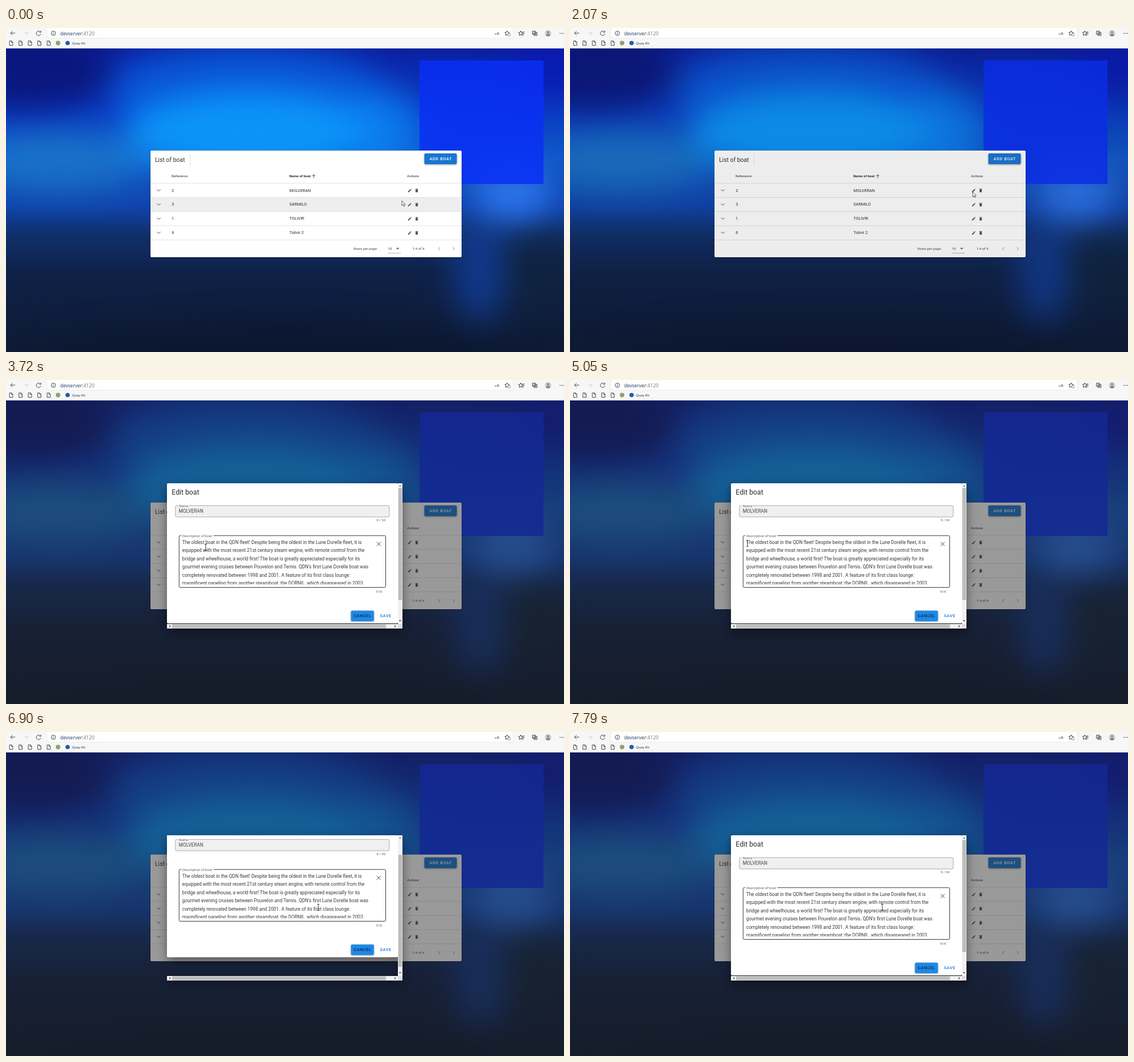
Write an HTML page that moves like this. It is 981 px wide and 571 px high and loops after 8 s.

```html
<!DOCTYPE html>
<html lang="en">
<head>
<meta charset="utf-8">
<title>Boat list</title>
<style>
  html, body { margin: 0; width: 100%; height: 100%; overflow: hidden; background: #0e1a33; }
  svg { display: block; width: 100%; height: 100%; font-family: Roboto, sans-serif; }
  .ui { font-family: "Open Sans", "Noto Sans", sans-serif; }
  .soft { filter: blur(28px); }
  .lift { filter: drop-shadow(0 1px 1.5px rgba(0, 0, 0, .4)); }
  .dialog { filter: drop-shadow(0 6px 9px rgba(0, 0, 0, .45)); }
  .line { fill: none; stroke: #444; stroke-width: 1; }
</style>
</head>
<body>
<svg id="stage" viewBox="0 0 981 571" preserveAspectRatio="none"></svg>
<script>
const LOOP = 8000;
const stage = document.getElementById('stage');

const text = (x, y, size, str, fill = '#2b2b2b', extra = '') =>
  `<text x="${x}" y="${y}" font-size="${size}" fill="${fill}" ${extra}>${str}</text>`;
const rect = (x, y, w, h, fill, extra = '') =>
  `<rect x="${x}" y="${y}" width="${w}" height="${h}" fill="${fill}" ${extra}/>`;
const line = (d, extra = '') => `<path class="line" d="${d}" ${extra}/>`;
const glow = (x, y, rx, ry, fill, opacity = 1) =>
  `<ellipse cx="${x}" cy="${y}" rx="${rx}" ry="${ry}" fill="${fill}" opacity="${opacity}"/>`;
const button = (x, y, str, fill) =>
  text(x, y, 7.25, str, fill, 'text-anchor="middle" font-weight="500" letter-spacing=".65"');
const icon = (x, y, d) =>
  `<path transform="translate(${x - 4.1} ${y - 4.1}) scale(.345)" d="${d}" fill="#555"/>`;

const PENCIL = 'M3 17v4h4L18 10l-4-4zM15 5l4 4 2-3-3-3z';
const BIN = 'M19 4h-3.500l-1-1h-5l-1 1H5v2h14zM6 7v12q0 2 2 2h8q2 0 2-2V7z';

function background() {
  const stops = [[0, '#0a20a0'], [.2, '#0a3cc4'], [.36, '#1058c8'], [.52, '#1044ac'],
    [.61, '#10306c'], [.74, '#0f2148'], [1, '#0e1a33']];
  return `<defs>
    <linearGradient id="sky" x2="0" y2="1">${stops.map(([o, c]) =>
      `<stop offset="${o}" stop-color="${c}"/>`).join('')}</linearGradient>
    <clipPath id="pane"><rect x="283" y="182" width="406" height="248"/></clipPath>
    <clipPath id="area"><rect x="305" y="278" width="340" height="82.300"/></clipPath>
  </defs>` +
  rect(0, 36, 981, 535, 'url(#sky)') +
  `<g class="soft">` +
    glow(40, 75, 150, 70, '#0a1678', .9) +
    glow(420, 110, 240, 80, '#0b60e0', .8) +
    glow(430, 185, 220, 75, '#0c98fa', .95) +
    glow(660, 180, 70, 70, '#0c8cfa', .7) +
    glow(90, 235, 150, 50, '#1c78c8', .8) +
    glow(960, 70, 80, 50, '#0a18b4', .8) +
    glow(890, 290, 70, 50, '#2f78f0', .9) +
    glow(930, 430, 90, 60, '#10243c', .8) +
    glow(833, 430, 45, 90, '#123f9e', .8) +
    glow(480, 575, 400, 50, '#0a1630', .7) +
  `</g>` + rect(727, 57, 218, 218, '#0a30f5', 'opacity=".85"');
}

function boatCard() {
  const rows = [['2', 'MOLVERAN'], ['3', 'SARMILO'], ['1', 'TOLIVIR'], ['6', 'Tolivir 2']];
  const head = (x, str, fill) => text(x, 263, 6.2, str, fill, 'font-weight="700"');
  return rect(254, 216, 547, 188, '#fff', 'rx="2" class="lift"') +
    text(262, 236, 10.2, 'List of boat', '#2b2b2b', 'letter-spacing=".1"') +
    rect(323, 222, .8, 21, '#ddd') +
    rect(735.5, 221, 57, 19, '#1976d2', 'rx="2" class="lift"') +
    button(764.3, 233.2, 'ADD BOAT', '#fff') +
    head(291, 'Reference', '#666') + head(498, 'Name of boat', '#2b2b2b') + head(705, 'Actions', '#666') +
    line('M541 264.500v-6M538.300 261l2.700-2.700 2.700 2.700') +
    rect(254, 299, 547, 24.5, '#eee', 'id="hover"') +
    rows.map(([ref, name], i) => {
      const y = 286 + i * 24.9;
      return rect(254, y - 12.7, 547, .8, '#dcdcdc') +
        line(`M265.500 ${y - 1.5}l3 3 3-3`) +
        text(291.2, y + 2.5, 7.25, ref) + text(498.2, y + 2.5, 7.25, name) +
        icon(709.8, y + .3, PENCIL) + icon(722, y + .3, BIN);
    }).join('') +
    rect(254, 373.2, 547, .8, '#dcdcdc') +
    text(611, 391, 6.2, 'Rows per page:', '#444') + text(671.3, 391, 6.2, '10', '#333') +
    '<path d="M685.500 387.500h6l-3 3z" fill="#666"/>' +
    rect(671, 396.5, 23, .8, '#999') + text(714.5, 391, 6.2, '1-4 of 4', '#444') +
    line('M763 386.300l-2.700 2.700 2.700 2.700M785.800 386.300l2.700 2.700-2.700 2.700', 'opacity=".6"');
}

function editDialog() {
  const story = [
    'The oldest boat in the QDN fleet! Despite being the oldest in the Lune Dorelle fleet, it is',
    'equipped with the most recent 21st century steam engine, with remote control from the',
    'bridge and wheelhouse, a world first! The boat is greatly appreciated especially for its',
    'gourmet evening cruises between Pouvelon and Ternis. QDN\'s first Lune Dorelle boat was',
    'completely renovated between 1998 and 2001. A feature of its first class lounge:',
    'magnificent paneling from another steamboat, the DORNIL, which disappeared in 2003.'
  ];
  const form = rect(283, 182, 406, 247, '#fff', 'rx="2"') +
    text(291.3, 202.3, 12.3, 'Edit boat') +
    rect(297.8, 221.3, 376, 20, '#f0f0f0', 'rx="2" stroke="#999" stroke-width=".8"') +
    rect(302, 220.5, 19.5, 1.6, '#f8f8f8', 'class="notch"') +
    text(304, 224, 6.2, 'Name', '#666', 'class="label"') +
    text(303.7, 234.2, 8.3, 'MOLVERAN', '#444') +
    text(667.5, 249, 6.2, '8 / 90', '#666', 'text-anchor="end"') +
    rect(304.3, 274.3, 363.2, 91.2, 'none', 'id="frame" rx="2" stroke-width=".9"') +
    rect(308, 273.5, 57, 1.8, '#fff', 'class="notch"') +
    text(310, 276.5, 6.2, 'Description of boat', '#666', 'class="label"') +
    `<g clip-path="url(#area)">${story.map((s, i) =>
      text(309.8, 288.9 + i * 14.45, 8.3, s, '#3a3a3a')).join('')}</g>` +
    line('M651.800 285.500l7 7m0-7l-7 7') +
    text(661, 375.3, 6.2, '518', '#666', 'text-anchor="end"') +
    rect(606.5, 406.5, 40.3, 18.5, '#1e88e5', 'rx="2" class="lift"') +
    button(627, 418.3, 'CANCEL', '#0b2c55') + button(667.7, 418.3, 'SAVE', '#1976d2');
  return `<g clip-path="url(#pane)"><g id="form">${form}</g></g>` +
    rect(689, 182, 8, 248, '#f1f1f1') + rect(283, 430, 414, 8, '#f1f1f1') +
    rect(689.7, 190.5, 6.6, 197.5, '#bdbdbd', 'id="thumb"') +
    rect(292, 430.7, 376, 6.6, '#bdbdbd') + rect(689, 430, 8, 8, '#dcdcdc') +
    '<path d="M690.800 187.800h4l-2-2.500z" fill="#777"/>' +
    '<path d="M690.800 423.300h4l-2 2.500zM289 432v4l-2.500-2zM683.300 432v4l2.500-2z" fill="#444"/>';
}

function browserBar() {
  const page = x => line(`M${x - 2.8} 22.800h3.600l2.200 2.200v5.600h-5.800zM${x + .6} 22.800v2.400h2.400`, 'stroke-width=".8"');
  const star = (x, y) => line(`M${x} ${y - 4}l1.200 2.700 3 .3-2.200 2 .6 3-2.600-1.500-2.600 1.500 .6-3-2.200-2 3-.3z`, 'stroke-width=".7"');
  return rect(0, 0, 981, 36, '#f7f7f7') +
    rect(72, -3, 820, 21, '#fff', 'rx="3" stroke="#e4e4e4" stroke-width=".8"') +
    line('M16 9H8m3.500-3.500L8 9l3.500 3.500') +
    line('M31 9h8m-3.500-3.500L39 9l-3.500 3.500', 'opacity=".2"') +
    line('M60.500 7a4 4 0 1 0 .7 3.200M61.300 4.700v2.800h-2.800') +
    '<circle class="line" cx="83.300" cy="9.300" r="3.800" stroke-width=".7"/>' +
    line('M83.300 8.800v2.600M83.300 7v1', 'stroke-width=".8"') +
    `<g class="ui">` +
      text(95, 12.5, 8.5, 'devserver<tspan fill="#777">:4120</tspan>', '#223a66') +
      text(116, 28.7, 6, 'Quay Kit', '#222') +
      text(858.7, 11.5, 6, 'aあ', '#555') +
    `</g>` +
    star(881, 9) + '<circle cx="884.500" cy="11.800" r="2.300" fill="#fff" stroke="#444" stroke-width=".6"/>' +
    star(905, 9) + line('M908 7h3.500M908.500 9.500h3M908 12h2.500', 'stroke-width=".8"') +
    line('M925.500 5.500h5.500v5.500h-5.500zM928 7.700h5.500v5.500h-5.500zM930.700 8.800v3.200M929.100 10.400h3.200', 'stroke-width=".8"') +
    '<circle cx="953" cy="9.300" r="5.700" fill="#d2cfca"/><circle cx="953" cy="7.600" r="2" fill="#88837c"/>' +
    '<path d="M949.200 13.300q0-3 3.800-3t3.800 3q-3.800 2.700-7.600 0z" fill="#88837c"/>' +
    [974, 977, 980].map(x => `<circle cx="${x}" cy="9.500" r=".8" fill="#333"/>`).join('') +
    [9, 25.5, 42, 58.5, 75].map(page).join('') +
    '<circle cx="91.500" cy="26.500" r="4" fill="#8aa66a"/><circle cx="108.300" cy="26.500" r="3.800" fill="#1c5fa8"/>';
}

stage.innerHTML = background() + boatCard() +
  rect(0, 36, 981, 535, '#212121', 'id="scrim"') +
  `<g id="dialog" class="dialog">${editDialog()}</g>` + browserBar() +
  `<g id="pointer">
    <path id="arrow" d="M0 0v8.500l2-1.700 1.500 3 1.300-.6-1.400-2.900h2.700z" fill="#fff" stroke="#222" stroke-width=".7"/>
    <path id="beam" d="M-2 -5.500h1.500l.5 .5 .5-.5h1.500M0 -5v10M-2 5.500h1.500l.5-.5 .5 .5h1.500" fill="none" stroke="#222" stroke-width=".9"/>
  </g>`;

const part = Object.fromEntries([...stage.querySelectorAll('g[id], rect[id], path[id]')].map(el => [el.id, el]));
const labels = stage.querySelectorAll('.label');
const notches = stage.querySelectorAll('.notch');
const clamp = (v, lo = 0, hi = 1) => Math.min(hi, Math.max(lo, v));
const show = (el, on) => el.setAttribute('visibility', on ? 'visible' : 'hidden');

// Progress from 0 to 1 in held steps; the first step lands at the start time.
function stepped(t, start, end, count) {
  if (t < start) return 0;
  if (t >= end) return 1;
  return (Math.floor((t - start) / (end - start) * (count - 1) + .2) + 1) / count;
}

// start, end, steps, x, y
const moves = [
  [120, 660, 6, 708, 289],
  [2400, 2730, 4, 572, 296],
  [2860, 3290, 5, 339, 297],
  [3720, 3720, 1, 351, 295],
  [3850, 3850, 1, 387, 295],
  [4270, 5050, 8, 312, 288],
  [5170, 5940, 8, 402, 289],
  [6040, 6350, 4, 549, 309]
];

function pointerAt(t) {
  let x = 696, y = 304.5;
  for (const [start, end, count, toX, toY] of moves) {
    const p = stepped(t, start, end, count);
    x += (toX - x) * p;
    y += (toY - y) * p;
  }
  return [x, y];
}

function render(t) {
  const [x, y] = pointerAt(t);
  const overText = x < 668;
  part.pointer.setAttribute('transform', `translate(${x} ${y})`);
  show(part.arrow, !overText);
  show(part.beam, overText);
  part.frame.setAttribute('stroke', overText ? '#222' : '#999');
  show(part.hover, t < 230);

  const held = Math.floor((t - 1960) / 110 + .02) * 110 + 1960;
  part.scrim.setAttribute('opacity', .46 * clamp((held - 2030) / 240));
  const open = 1 - (1 - clamp((held - 2075) / 244)) ** 2;
  const scale = .5 + .5 * open;
  part.dialog.setAttribute('opacity', open);
  show(part.dialog, open > 0);
  part.dialog.setAttribute('transform', `translate(490 310) scale(${scale}) translate(-490 -310)`);
  const drop = clamp((2400 - held) / 110 * 3.6, 0, 9);
  labels.forEach(el => el.setAttribute('transform', `translate(0 ${drop})`));
  notches.forEach(el => el.setAttribute('opacity', drop ? 0 : 1));

  const down = 1 - (1 - stepped(t, 6570, 7140, 6)) ** 1.82;
  const up = 1 - (1 - stepped(t, 7570, 7790, 3)) ** 1.82;
  const scroll = 37 * (down - up);
  part.form.setAttribute('transform', `translate(0 ${-scroll})`);
  part.thumb.setAttribute('transform', `translate(0 ${scroll * .81})`);
}

const begin = performance.now();
function tick() {
  render((performance.now() - begin) % LOOP);
  requestAnimationFrame(tick);
}
tick();
</script>
</body>
</html>
```
